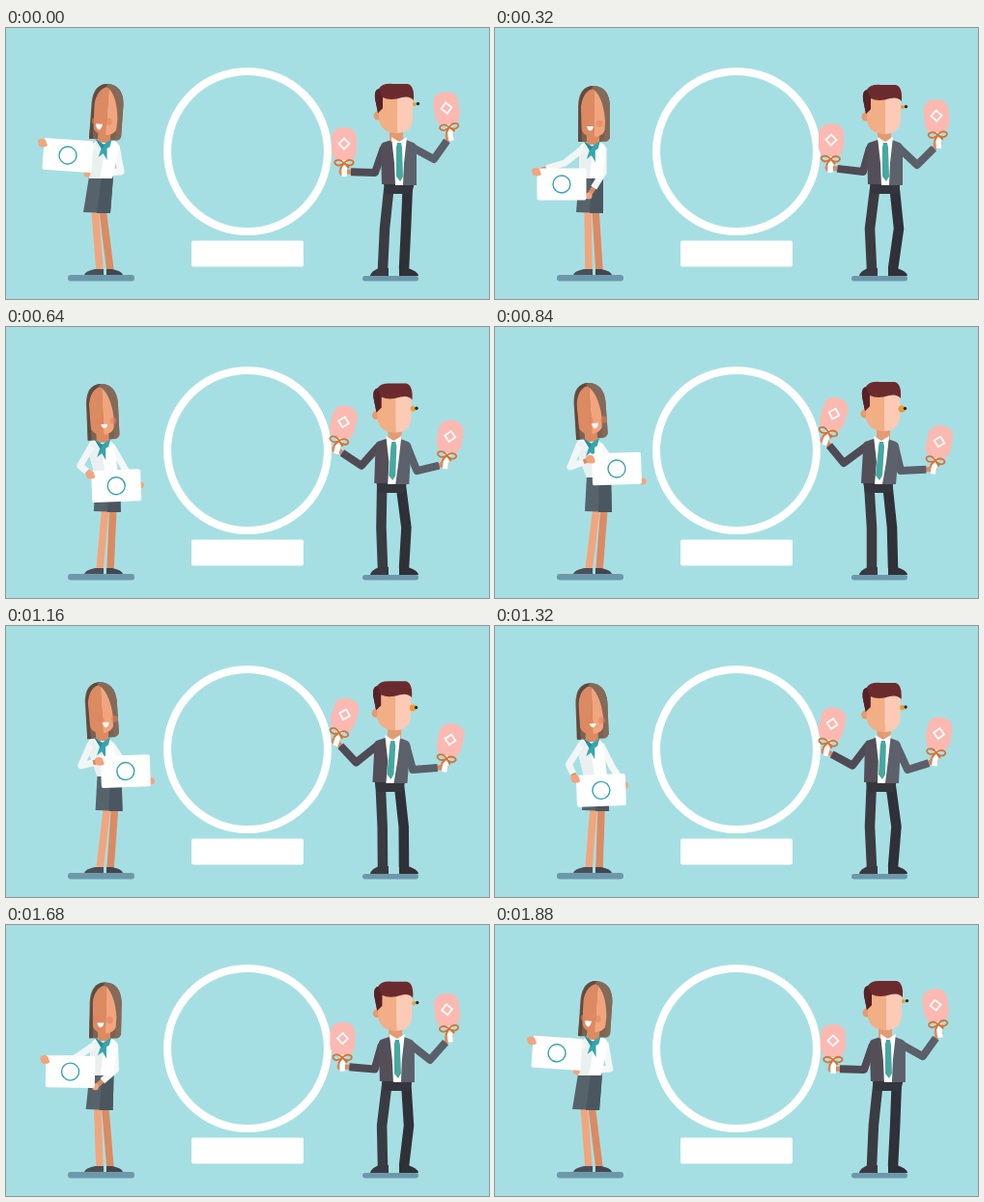
Recreate the animation shown at these times as an HTML page with a canvas. Size 500x281 px, loop 1.92 s.

```html
<!DOCTYPE html>
<html lang="en">
<head>
<meta charset="utf-8">
<title>Two presenters</title>
<style>
html, body { margin: 0; width: 100%; height: 100%; overflow: hidden; background: #a6dfe3; }
canvas { display: block; width: 100vw; height: 100vh; }
</style>
</head>
<body>
<canvas id="stage" width="500" height="281"></canvas>
<script>
const ctx = document.getElementById('stage').getContext('2d');
const LOOP = 1920, STEP = 40;
const SKIN = '#f2a57d', TAN = '#dc8a62', TEAL = '#35a5ae';

// time, waist x, skirt shift, head x y turn, look, left elbow, left hand, right elbow, right hand, card x y turn
const WOMAN = [
  [0, 97, -3, 104, 86, 4, -6, 70, 135, 38, 119, 119, 149, 84, 151, 64, 132, 4],
  [320, 98, 0, 102, 88, 0, -3, 72, 140, 43, 149, 112, 150, 97, 174, 69, 162, 0],
  [440, 100, 1, 102, 88, 0, -2, 74, 145, 56, 167, 115, 148, 108, 176, 80, 183, -1],
  [480, 101, 1, 101, 88, -1, -1, 75, 143, 70, 171, 118, 147, 120, 170, 96, 185, -2],
  [840, 106, 1, 98, 86, -4, 5, 78, 145, 99, 137, 128, 150, 153, 160, 126, 147, -2]
];
// time, chest x, hip x, head x y, elbows, left paddle x y turn, right paddle x y turn, knees x, pencil y and size
const MAN = [
  [0, 406, 407, 403, 84, 382, 150, 443, 136, 350, 120, 0, 456, 83, -8, 392, 414, -5, 2],
  [320, 403, 404, 402, 85, 381, 149, 437, 142, 348, 116, 2, 457, 91, -4, 388, 418, -3, 2],
  [480, 402, 402, 402, 86, 376, 147, 432, 148, 348, 109, 8, 459, 105, 5, 387, 418, -2, 2],
  [840, 399, 397, 401, 83, 361, 141, 420, 149, 351, 90, 18, 460, 119, 12, 390, 411, 2, 3.5]
];

// Smooth curve through the poses, at rest at both ends
function pose(keys, time) {
  const last = keys.length - 1;
  if (time >= keys[last][0]) return keys[last];
  const i = keys.findIndex((key, n) => time < keys[n + 1][0]);
  const a = keys[i], b = keys[i + 1], span = b[0] - a[0];
  const s = (time - a[0]) / span, s2 = s * s, s3 = s2 * s;
  const slope = (n, k) => n === 0 || n === last ? 0 :
    (keys[n + 1][k] - keys[n - 1][k]) / (keys[n + 1][0] - keys[n - 1][0]) * span;
  return a.map((v, k) => v * (2 * s3 - 3 * s2 + 1) + b[k] * (3 * s2 - 2 * s3) +
    slope(i, k) * (s3 - 2 * s2 + s) + slope(i + 1, k) * (s3 - s2));
}

function shape(color, d) {
  ctx.fillStyle = color;
  ctx.fill(new Path2D(d));
}
function poly(color, ...pts) {
  shape(color, 'M' + pts.join(' ') + 'Z');
}
function disc(color, x, y, r) {
  ctx.fillStyle = color;
  ctx.beginPath();
  ctx.arc(x, y, r, 0, 7);
  ctx.fill();
}
function box(color, x, y, w, h, r) {
  ctx.fillStyle = color;
  ctx.beginPath();
  ctx.roundRect(x, y, w, h, r);
  ctx.fill();
}
function ring(color, x, y, r, width) {
  ctx.strokeStyle = color;
  ctx.lineWidth = width;
  ctx.beginPath();
  ctx.arc(x, y, r, 0, 7);
  ctx.stroke();
}
function limb(color, width, ...pts) {
  ctx.strokeStyle = color;
  ctx.lineWidth = width;
  ctx.lineJoin = 'round';
  ctx.lineCap = 'butt';
  ctx.stroke(new Path2D('M' + pts.join(' ')));
}
function at(x, y, turn, draw) {
  ctx.save();
  ctx.translate(x, y);
  ctx.rotate(turn * Math.PI / 180);
  draw();
  ctx.restore();
}
// Clip to an outline and paint its two halves
function twoTone(d, left, right, split) {
  ctx.save();
  ctx.clip(new Path2D(d));
  ctx.fillStyle = left;
  ctx.fillRect(-60, -60, 60 + split, 120);
  ctx.fillStyle = right;
  ctx.fillRect(split, -60, 60, 120);
  ctx.restore();
}

function scenery() {
  ctx.fillStyle = '#a6dfe3';
  ctx.fillRect(0, 0, 500, 281);
  ring('#fff', 250, 128, 83, 8);
  box('#fff', 192, 220.5, 116, 27, 2);
  box('#6d98ab', 64, 256, 69, 6.5, 3);
  box('#6d98ab', 369, 257, 58, 5.5, 3);
}

function sleeve(color, x, y, ex, ey, hx, hy) {
  const wx = ex + (hx - ex) * .65, wy = ey + (hy - ey) * .65;
  limb(TAN, 5, ex, ey, hx, hy);
  limb(color, 7, x, y, ex, ey, wx, wy);
}

function womanHead(look) {
  shape('#7d6252', 'M-16 30V-8Q-15-28 0-28Q16-27 17-8V26Q14 30 8 30Z');
  box(TAN, -7, 16, 13, 17, 4);
  twoTone('M-13-8Q-11-24-2-25Q13-20 13 0V13Q12 25-1 25Q-13 24-13 13Z', TAN, SKIN, 1);
  shape('#5f4b42', 'M-15-10Q-13-28 0-28L-1-25Q-11-22-13-7L-12 30H-16Z');
  shape('#856a59', 'M-2-26Q10-18 12 8L11 30Q17 30 17 24V-8Q15-28 0-28Z');
  ctx.globalAlpha = .55;
  disc('#e8805f', look - 5, 11, 3.5);
  disc('#e8805f', look + 9, 11, 3.5);
  ctx.globalAlpha = 1;
  const big = 2 + Math.abs(look) * .5;
  shape('#fff', `M${look - 4} 14H${look + 3}Q${look + 2} ${15 + big} ${look - .5} ${15 + big}Q${look - 3} ${15 + big} ${look - 4} 14Z`);
}

function woman(p) {
  const [, wx, shift, hx, hy, turn, look, lex, ley, lhx, lhy, rex, rey, rhx, rhy, cx, cy, ct] = p;
  const bx = wx + shift, nx = hx - 1, top = hy + 31;
  limb(SKIN, 7.5, bx - 2, 188, 97, 252);
  limb(TAN, 7.5, bx + 6, 188, 108, 252);
  shape('#4b5058', 'M81 256Q82 252 92 250H101V256Z');
  shape('#42464e', 'M104 256V250H110Q120 252 121 256Z');
  poly('#57636b', wx - 11, 154, wx + 14, 154, bx + 14, 192, bx - 14, 191);
  poly('#4b5760', wx + 2, 154, wx + 14, 154, bx + 14, 192, bx, 192);
  sleeve('#f5f8f8', nx + 11, top + 5, rex, rey, rhx, rhy);
  shape('#fff', `M${nx - 9} ${top}H${nx + 9}Q${nx + 14} ${top + 2} ${nx + 14} ${top + 8}L${wx + 13} 156H${wx - 11}L${nx - 14} ${top + 8}Q${nx - 13} ${top + 2} ${nx - 9} ${top}Z`);
  poly('#eaf0f0', nx - 14, top + 8, nx - 8, top, nx, top + 8, wx, 156, wx - 11, 156);
  at(hx, hy, turn, () => womanHead(look));
  const kx = nx + look * .4;
  poly(TEAL, kx - 8, top - 2, kx, top + 4, kx + 9, top - 2, kx + 7, top + 6, kx + 4, top + 8, kx + 4, top + 20, kx, top + 13, kx - 5, top + 17, kx - 2, top + 8);
  poly('#288f9c', kx - 8, top - 2, kx + 1, top + 4, kx - 1, top + 9);
  sleeve('#f1f6f6', nx - 10, top + 6, lex, ley, lhx, lhy);
  disc(SKIN, rhx, rhy, 3.5);
  at(cx, cy, ct, () => {
    box('#fff', -25.5, -16.5, 51, 33, 2);
    ring(TEAL, 0, 0, 9, 1.4);
  });
  shape(SKIN, `M${lhx - 5} ${lhy - 2}Q${lhx - 2} ${lhy - 6} ${lhx + 3} ${lhy - 3}L${lhx + 5} ${lhy + 3}Q${lhx} ${lhy + 6} ${lhx - 4} ${lhy + 3}Z`);
}

function paddle() {
  disc(TAN, -1, 29, 4.5);
  box('#fff', -2.5, 16, 5.5, 18, 1);
  shape('#fbb9b1', 'M-13-6Q-12-17 0-17Q12-17 13-6V7Q12 17 4 17H-4Q-12 17-13 7Z');
  ctx.strokeStyle = '#fff';
  ctx.lineWidth = 1.8;
  ctx.lineJoin = 'miter';
  ctx.stroke(new Path2D('M0-5.5L5.5 0L0 5.5L-5.5 0Z'));
  ctx.strokeStyle = '#dc7130';
  ctx.stroke(new Path2D('M0 20C-5 14-12 18-9 21S-3 22 0 20C5 14 12 18 9 21S3 22 0 20L-4 26M0 20L5 25'));
}

function manHead(penY, penSize) {
  disc('#e89a70', -18, 7, 4.5);
  twoTone('M-17-14H18V10Q17 25 1 25Q-16 24-17 10Z', '#f2ae85', '#fccab5', 2);
  shape('#6b2b2e', 'M-18 4L-21-11Q-22-20-17-21Q-14-27-2-26H13Q20-24 19-9Q15-14 7-12Q-5-8-13-12V-1Z');
  shape('#572227', 'M-18 4L-21-11Q-22-20-17-21L-13-12V-1Z');
  disc('#f09a31', 20, penY, penSize);
  disc('#33292d', 23.5, penY - .5, 1.7);
}

function man(p) {
  const [, cx, px, hx, hy, lex, ley, rex, rey, lx, ly, lt, rx, ry, rt, kl, kr, penY, penSize] = p;
  const hand = (x, y, turn) => {
    const a = turn * Math.PI / 180;
    return [x - 25 * Math.sin(a) * 1.2, y + 29 * Math.cos(a)];
  };
  const arm = (color, x, ex, ey, [wx, wy]) => {
    const s = .78;
    limb(TAN, 5, ex, ey, wx, wy);
    limb(color, 8, x, 124, ex, ey, ex + (wx - ex) * s, ey + (wy - ey) * s);
  };
  limb('#3b3b42', 10.5, px - 10, 160, kl, 208, 390, 250);
  limb('#303138', 10.5, px + 9, 160, kr, 208, 412, 250);
  poly('#35363d', px - 16, 160, px + 16, 160, px + 13, 172, px - 14, 172);
  shape('#393a40', 'M377 257Q378 252 386 249H396V257Z');
  shape('#303137', 'M407 257V249H416Q426 252 427 257Z');
  arm('#4f4a54', cx - 15, lex, ley, hand(lx, ly, lt));
  arm('#5a5f69', cx + 15, rex, rey, hand(rx, ry, rt));
  shape('#544e58', `M${cx - 7} 116L${cx - 16} 119Q${cx - 19} 121 ${cx - 18} 127L${px - 18} 162H${px}V116Z`);
  shape('#5d616b', `M${cx + 8} 116L${cx + 16} 119Q${cx + 20} 121 ${cx + 19} 127L${px + 18} 163H${px}V116Z`);
  box('#e49b73', hx - 6, 102, 14, 16, 3);
  poly('#fff', cx - 7, 113, cx + 1, 118, cx + 9, 113, cx + 6, 140, px + 4, 163, px - 4, 163, cx - 4, 140);
  poly('#45a9a1', cx - 1, 119, cx + 3, 119, cx + 4, 124, px + 4, 154, px + 1, 159, px - 3, 154, cx - 2, 124);
  at(hx, hy, 0, () => manHead(penY, penSize));
  at(lx, ly, lt, paddle);
  at(rx, ry, rt, paddle);
}

const start = performance.now();
function frame() {
  const time = Math.floor((performance.now() - start) / STEP) * STEP % LOOP;
  const swing = LOOP / 2 - Math.abs(LOOP / 2 - time); // out and back
  scenery();
  woman(pose(WOMAN, swing));
  man(pose(MAN, swing));
  requestAnimationFrame(frame);
}
frame();
</script>
</body>
</html>
```
